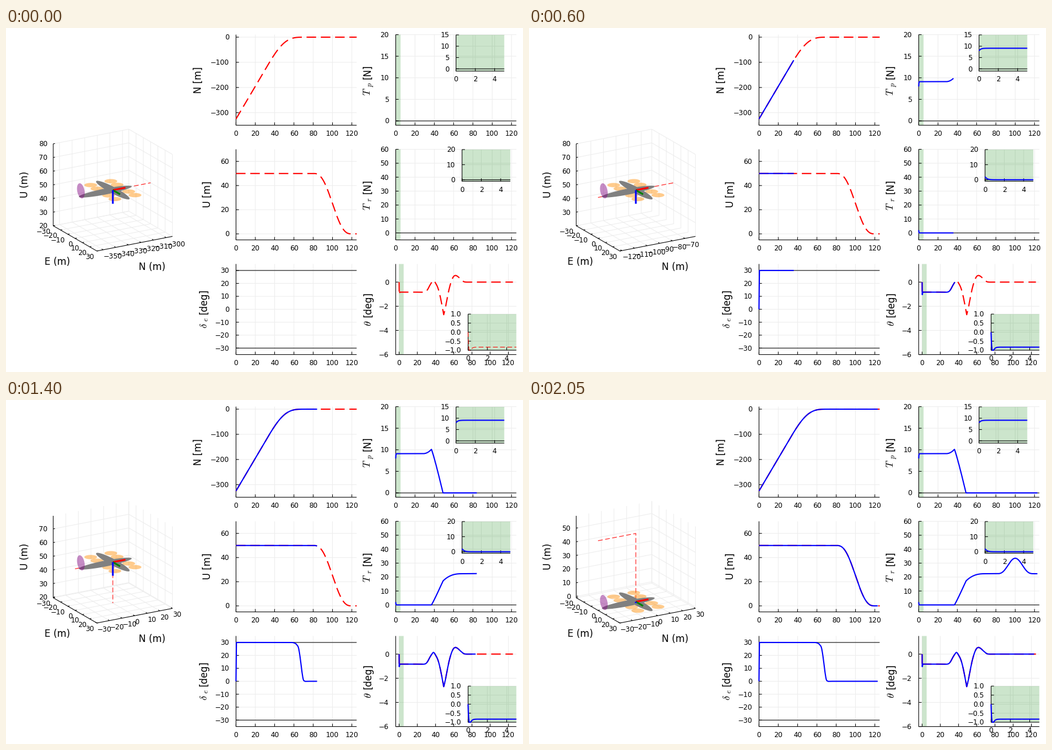
A matplotlib script for the animation above (3.1 s loop, 900 by 600 pixels).

```python
import numpy as np
import matplotlib.pyplot as plt
from matplotlib.animation import FuncAnimation
from matplotlib.patches import Polygon, Rectangle

W, H, DPI = 900, 600, 100
PX = 72 / DPI  # points per pixel
TICK, LABEL = 12 * PX, 16.5 * PX
THIN, BOLD = 1.04 * PX, 2.07 * PX
DASH = (0, (8, 4))
STEP, LAST, FRAMES = 3, 41, 62

plt.rcParams["font.family"] = "DejaVu Sans"
plt.rcParams["mathtext.fontset"] = "cm"
plt.rcParams["path.snap"] = False

fig = plt.figure(figsize=(W / DPI, H / DPI), dpi=DPI, facecolor="white")
ax = fig.add_axes([0, 0, 1, 1])
ax.set_xlim(0, W)
ax.set_ylim(H, 0)
ax.axis("off")


# ---------- flight profiles ----------
def smooth(t, pts):
    """Cubic Hermite curve through a few points, constant outside."""
    x, y = np.array(pts, float).T
    m = np.gradient(y, x)
    t = np.clip(t, x[0], x[-1])
    i = np.clip(np.searchsorted(x, t) - 1, 0, len(x) - 2)
    h = x[i + 1] - x[i]
    s = (t - x[i]) / h
    return ((1 + 2 * s) * (1 - s) ** 2 * y[i] + s * (1 - s) ** 2 * h * m[i]
            + s * s * (3 - 2 * s) * y[i + 1] + s * s * (s - 1) * h * m[i + 1])


def north(t):
    s = np.clip((t - 28) / 44, 0, 1)
    lost = 44 * (2.5 * s**4 - 3 * s**5 + s**6) + np.maximum(t - 72, 0)
    return -325 + 6.5 * (t - lost)


def up(t):
    s = np.clip((t - 80) / 40, 0, 1)
    lift = 5e-4 * np.maximum((t - 28) * (37 - t), 0)  # slight climb on braking
    return 50 * (1 - (10 * s**3 - 15 * s**4 + 6 * s**5)) + lift


def elevator(t):
    fall = smooth(t, [(54, 30), (57, 30), (60, 29.7), (62.5, 28.6), (65, 25),
                      (66.7, 17), (68.2, 8), (69.6, 1.7), (71.2, 0.1), (73, 0)])
    return np.where(t < 0.4, 75 * t, fall)


def pusher(t):
    rise = np.clip((t - 28) / 9, 0, 1) ** 2.2
    drop = np.clip((t - 37) / 12, 0, 1) ** 1.12
    return (9.1 - 1.1 * np.exp(-t / 0.18) + rise) * (1 - drop)


def rotors(t):
    ramp = 17.2 * np.clip((t - 37) / 12, 0, 1) ** 1.08
    settle = 5.2 * (1 - (1 - np.clip((t - 49) / 20, 0, 1)) ** 2.6)
    s = np.clip((t - 80) / 40, 0, 1)
    return 2 * np.exp(-t / 0.2) + ramp + settle + 11.1 * (4 * s * (1 - s)) ** 4


def pitch(t):
    start = -0.83 * (1 - np.exp(-t / 0.1) * (1 - 14 * t))
    dive = smooth(t, [(25, -.83), (27.5, -.83), (29.6, -.77), (31.5, -.59),
                      (33.5, -.3), (36, 0), (37.6, .14), (40, -.08),
                      (43, -.57), (46, -1.5), (48, -2.32), (49, -2.7)])
    rise = smooth(t, [(49, -2.7), (50.5, -2.25), (52.4, -1.5), (55, -.55),
                      (57.5, .1), (59.5, .43), (61.8, .55), (64.3, .47),
                      (67.5, .25), (71.3, .03), (73.5, 0), (76, 0)])
    return np.where(t < 25, start, np.where(t < 49, dive, rise))


# ---------- drawing helpers ----------
def line(x, y, color, lw, z, ls="-"):
    return ax.plot(x, y, color=color, lw=lw, ls=ls, zorder=z,
                   solid_capstyle="butt", dash_capstyle="butt")[0]


def write(x, y, s, size=TICK, ha="center", rot=0, z=30):
    return ax.text(x, y, s, fontsize=size, ha=ha, va="baseline",
                   rotation=rot, rotation_mode="anchor", zorder=z)


def number(v, digits=0):
    return f"{v:.{digits}f}".replace("-", "\u2212")


GRID = "0.93"
T = np.r_[np.linspace(0, 5, 500), np.linspace(5.05, 125, 2400)]


class Panel:
    def __init__(self, box, xr, yr, xticks, yticks, func,
                 band=None, rules=(), z=1, digits=0):
        self.x0, self.y0, self.x1, self.y1 = box
        self.xr, self.yr, self.func, self.z = xr, yr, func, z
        (x0, y0, x1, y1) = box
        if band:
            a, b = self.x(band[0]), self.x(band[1])
            ax.add_patch(Rectangle((a, y0), b - a, y1 - y0, fc="green",
                                   alpha=0.2, lw=0, zorder=z + 1))
        for v in xticks:
            p = self.x(v)
            line([p, p], [y0, y1], GRID, THIN, z)
            line([p, p], [y1, y1 - 5], "k", THIN, z + 2)
            write(p, y1 + 18.2, number(v))
        for v in yticks:
            p = self.y(v)
            line([x0, x1], [p, p], GRID, THIN, z)
            line([x0, x0 + 5], [p, p], "k", THIN, z + 2)
            write(x0 - 12, p + 4.4, number(v, digits), ha="right")
        line([x0, x0, x1], [y0, y1, y1], "k", THIN, z + 2)
        for v in rules:
            line([x0, x1], [self.y(v)] * 2, "k", THIN, z + 3)
        self.trace = line([], [], "blue", BOLD, z + 5)

    def x(self, v):
        a, b = self.xr
        return self.x0 + (v - a) / (b - a) * (self.x1 - self.x0)

    def y(self, v):
        a, b = self.yr
        return self.y1 - (v - a) / (b - a) * (self.y1 - self.y0)

    def path(self, end):
        t = T[T <= min(end, self.xr[1]) + 1e-9]
        return self.x(t), self.y(np.clip(self.func(t), *self.yr))

    def reference(self, lw=BOLD):
        line(*self.path(125), "red", lw, self.z + 4, DASH)

    def update(self, end):
        self.trace.set_data(*(self.path(end) if end > 0 else ([], [])))


LONG, SHORT = range(0, 121, 20), (0, 2, 4)
FULL, ZOOM = (0, 125), (0, 5)
L0, L1, R0, R1 = 400.4, 610.4, 678.4, 888.4
p_n = Panel((L0, 11.6, L1, 169.6), FULL, (-350, 10), LONG,
            range(-300, 1, 100), north)
p_u = Panel((L0, 211.6, L1, 369.6), FULL, (-5, 70), LONG,
            range(0, 61, 20), up)
p_d = Panel((L0, 411.6, L1, 569.6), FULL, (-35, 35), LONG,
            range(-30, 31, 10), elevator, rules=(-30, 30))
p_p = Panel((R0, 11.6, R1, 169.6), FULL, (-1, 20), LONG,
            range(0, 21, 5), pusher, band=ZOOM, rules=(0,))
p_r = Panel((R0, 211.6, R1, 369.6), FULL, (-5, 60), LONG,
            range(0, 61, 10), rotors, band=ZOOM, rules=(0,))
p_t = Panel((R0, 411.6, R1, 569.6), (-3.75, 128.75), (-6, 1.5), LONG,
            range(-6, 1, 2), pitch, band=ZOOM)
z_p = Panel((783.4, 12, 867.4, 75.2), ZOOM, (-1, 15), SHORT,
            range(0, 16, 5), pusher, band=ZOOM, rules=(0,), z=11)
z_r = Panel((793.9, 212, 877.9, 267.3), ZOOM, (-1, 20), SHORT,
            range(0, 21, 10), rotors, band=ZOOM, rules=(0,), z=11)
z_t = Panel((804.4, 499, 888.4, 562), ZOOM, (-1, 1), SHORT,
            np.arange(-1, 1.1, 0.5), pitch, band=ZOOM, z=11, digits=1)
panels = [p_n, p_u, p_d, p_p, p_r, p_t, z_p, z_r, z_t]
for p in (p_n, p_u, p_t):
    p.reference()
z_t.reference(THIN)

for x, y, s in [(339.5, 90.5, "N [m]"), (355.5, 290, "U [m]"),
                (349.5, 477, "[deg]"), (634.5, 76.5, "[N]"),
                (634.5, 276.5, "[N]"), (635.5, 481.5, "[deg]"),
                (38.5, 273, "U (m)")]:
    write(x, y, s, LABEL, rot=90)
for x, y, s, k in [(349.5, 519, r"$\delta$", 1), (352, 508.5, "$e$", .72),
                   (634.5, 111, "$T$", 1), (637, 98.5, "$p$", .72),
                   (634.5, 311, "$T$", 1), (637, 299, "$r$", .72),
                   (635.5, 515, r"$\theta$", 1)]:
    write(x, y, s, LABEL * k * 1.05, rot=90)
write(89.5, 413, "E (m)", LABEL)
write(254.5, 422, "N (m)", LABEL)

# ---------- 3D view ----------
ANGLE = np.linspace(0, 2 * np.pi, 73)
EAST = range(-30, 31, 10)
scene = []


def tens(lo, hi):
    first = np.ceil(lo / 10 - 1e-6) * 10
    return np.arange(first, hi + 1e-4, 10)


class View:
    def __init__(self, n, u):
        self.n, self.u = n, u
        self.n0, self.u0 = n - 30, max(u - 30, -1)
        self.n1, self.u1 = self.n0 + 60, self.u0 + 60

    def at(self, n, e, u):
        dn, de, du = n - self.n0, e + 30, u - self.u0
        return (82.2 + 2.192 * dn + 1.267 * de,
                345 - 0.425 * dn + 0.733 * de - 2.383 * du)

    def body(self, n, e, u):
        return self.at(self.n + n, e, self.u + u)

    def poly(self, pts, color, lw, z, ls="-"):
        xy = [self.at(*p) for p in pts]
        scene.append(line(*zip(*xy), color, lw, z, ls))

    def disc(self, n, e, u, rn, re, ru, color, alpha, z):
        c, s = np.cos(ANGLE), np.sin(ANGLE)
        x, y = self.body(n + rn * c, e + re * (s if rn else c), u + ru * s)
        shape = Polygon(np.c_[x, y], fc=color, alpha=alpha, lw=0, zorder=z)
        scene.append(ax.add_patch(shape))

    def tick(self, p, dx, dy):
        scene.append(line([p[0], p[0] + dx], [p[1], p[1] + dy], "k", THIN, 3))

    def axes(self):
        n0, n1, u0, u1 = self.n0, self.n1, self.u0, self.u1
        for n in tens(n0, n1):
            self.poly([(n, 30, u0), (n, -30, u0), (n, -30, u1)], GRID, THIN, 1)
            x, y = self.at(n, 30, u0)
            self.tick((x, y), -2.6, -1.5)
            scene.append(write(x + .5, y + 14.9, number(n + 0.0), ha="left"))
        for e in EAST:
            self.poly([(n0, e, u0), (n1, e, u0), (n1, e, u1)], GRID, THIN, 1)
            x, y = self.at(n0, e, u0)
            self.tick((x, y), 3, -0.6)
            scene.append(write(x - 4.8, y + 13.9, number(e), ha="right"))
        for u in tens(u0, u1):
            self.poly([(n0, -30, u), (n1, -30, u), (n1, 30, u)], GRID, THIN, 1)
            x, y = self.at(n0, -30, u)
            self.tick((x, y), 3, -0.6)
            scene.append(write(72.5, y + 4.4, number(u + 0.0), ha="right"))
        self.poly([(n0, -30, u1), (n0, -30, u0), (n0, 30, u0), (n1, 30, u0)],
                  "k", THIN, 3)

    def route(self):
        pts = [(max(-325, self.n0), 0, 50), (min(0, self.n1), 0, 50)]
        if self.n1 > 0:
            pts.append((0, 0, max(0, self.u0)))
        self.poly(pts, "red", THIN, 4, DASH)

    def craft(self):
        for e in (-16.6, -8, 8, 16.6):
            for n in (-8, 8):
                self.disc(n, e, 0, 4.4, 4.4, 0, "darkorange", 0.45, 5)
        self.disc(-6, 0, 0, 21, 0, 2.2, "gray", 1, 6)
        self.disc(0, 0, 0, 4, 22, 0, "gray", 1, 6)
        self.disc(-25.4, 0, 4, 0, 5.3, 5.3, "purple", 0.45, 7)
        down = -min(10, self.u - self.u0)
        for tip, color in [((10, 0, 0), "red"), ((0, 10, 0), "green"),
                           ((0, 0, down), "blue")]:
            a, b = self.body(0, 0, 0), self.body(*tip)
            scene.append(line(*zip(a, b), color, 3 * PX, 8))


def draw(k):
    t = float(STEP * min(k, LAST))
    for p in panels:
        p.update(t)
    while scene:
        scene.pop().remove()
    view = View(float(north(t)), float(up(t)))
    view.axes()
    view.route()
    view.craft()
    return []


anim = FuncAnimation(fig, draw, frames=FRAMES, interval=50,
                     init_func=lambda: [], repeat=True, repeat_delay=0)
plt.show()
```
